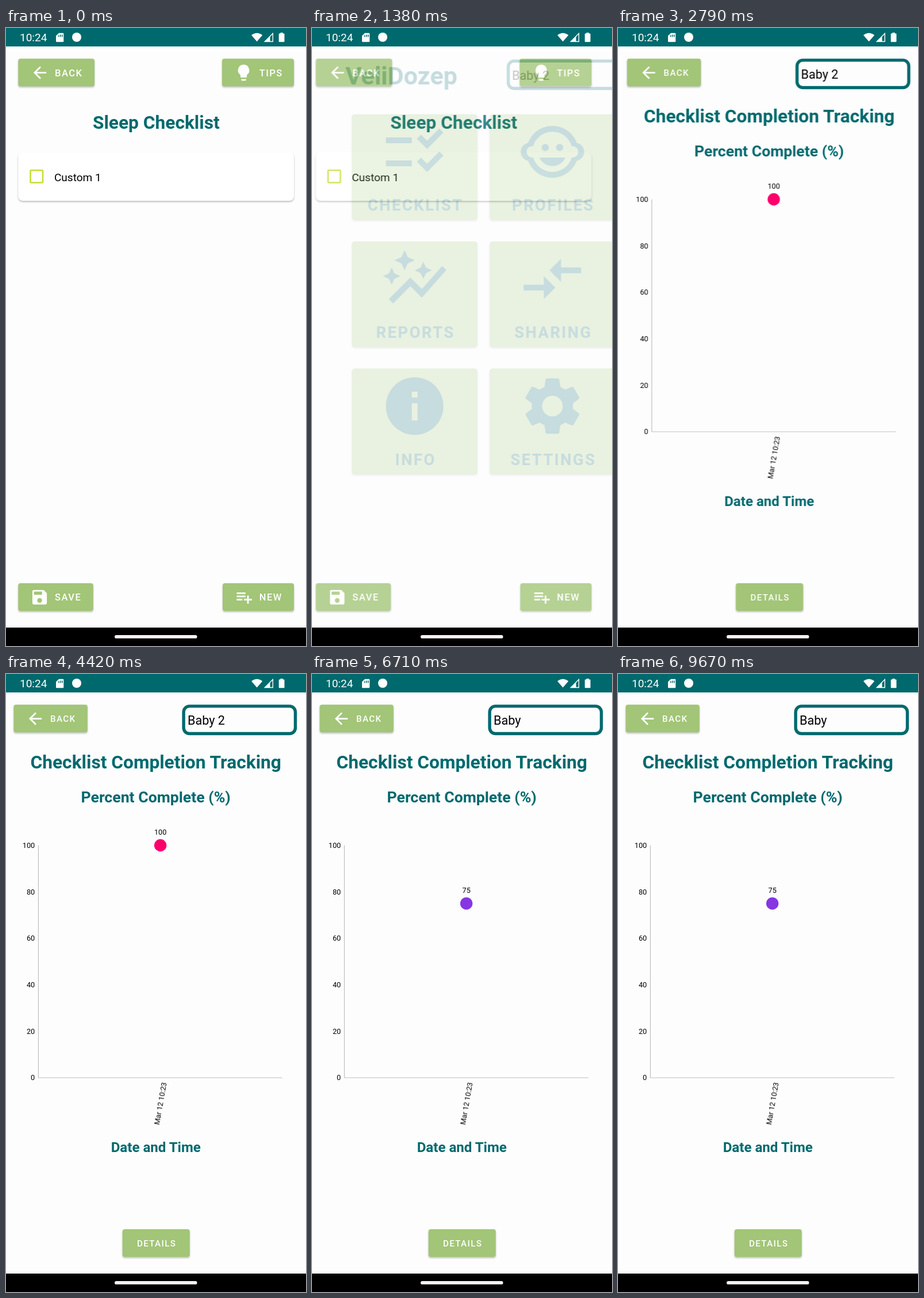
An HTML page that plays this animation: 522x1073 px, repeating every 9710 ms.

```html
<!DOCTYPE html>
<html lang="en">
<head>
<meta charset="utf-8">
<title>Sleep checklist app</title>
<style>
  html, body { margin: 0; width: 100%; height: 100%; overflow: hidden; background: #fdfdfe; }
  svg { display: block; width: 100vw; height: 100vh; font-family: Roboto, sans-serif; }
  .teal { fill: #00696d; }
  .white { fill: #fff; }
  .bold { font-weight: 700; }
  .mid { text-anchor: middle; }
  .end { text-anchor: end; }
  .page { fill: #fdfdfe; }
  .green { fill: #a2c577; }
  .raised { filter: drop-shadow(0 2px 1.8px rgba(0, 0, 0, .25)); }
  .label { font-weight: 500; letter-spacing: .0893em; fill: #fff; }
  .tile { font-weight: 700; font-size: 27.4px; letter-spacing: .0893em; }
  .small { font-size: 12.7px; }

  #checklist, #home, #report, #tap, #before, #after { animation: 9710ms linear infinite; }
  #checklist { animation-name: exit-first; }
  #home { animation-name: enter-home, fade-home; }
  #homeBody { animation: exit-second 9710ms linear infinite; }
  #report { animation-name: enter-report, fade-report; }
  #tap { animation-name: tap; animation-timing-function: step-end; }
  #before { animation-name: hide; animation-timing-function: step-end; }
  #after { animation-name: show; animation-timing-function: step-end; }

  /* Each 450 ms slide is a fast start joined to a very slow stop. */
  @keyframes exit-first {
    0%, 13.522% { transform: translateX(0); animation-timing-function: cubic-bezier(.3, 0, .8, .15); }
    14.295% { transform: translateX(-20.88px); animation-timing-function: cubic-bezier(.05, .7, .1, 1); }
    18.157%, 100% { transform: translateX(-52.2px); }
  }
  @keyframes enter-home {
    0%, 13.522% { transform: translateX(52.2px); animation-timing-function: cubic-bezier(.3, 0, .8, .15); }
    14.295% { transform: translateX(31.32px); animation-timing-function: cubic-bezier(.05, .7, .1, 1); }
    18.157%, 100% { transform: translateX(0); }
  }
  @keyframes fade-home {
    0%, 14.037% { opacity: 0; }
    14.892%, 100% { opacity: 1; }
  }
  @keyframes exit-second {
    0%, 26.365% { transform: translateX(0); animation-timing-function: cubic-bezier(.3, 0, .8, .15); }
    27.137% { transform: translateX(-20.88px); animation-timing-function: cubic-bezier(.05, .7, .1, 1); }
    30.999%, 100% { transform: translateX(-52.2px); }
  }
  @keyframes enter-report {
    0%, 26.365% { transform: translateX(52.2px); animation-timing-function: cubic-bezier(.3, 0, .8, .15); }
    27.137% { transform: translateX(31.32px); animation-timing-function: cubic-bezier(.05, .7, .1, 1); }
    30.999%, 100% { transform: translateX(0); }
  }
  @keyframes fade-report {
    0%, 26.88% { opacity: 0; }
    27.734%, 100% { opacity: 1; }
  }
  @keyframes tap {
    0% { opacity: 0; }
    22.35% { opacity: 1; }
    24%, 100% { opacity: 0; }
  }
  @keyframes hide { 0% { opacity: 1; } 64.88%, 100% { opacity: 0; } }
  @keyframes show { 0% { opacity: 0; } 64.88%, 100% { opacity: 1; } }
</style>
</head>
<body>
<svg id="stage" viewBox="0 0 522 1073" preserveAspectRatio="none"></svg>
<script>
const path = d => `<path d="${d}"/>`;
const sixTeeth = [0, 60, 120, 180, 240, 300].map(a =>
  `<path transform="rotate(${a} 12 12)" d="M9.25 5.35 9.6 2.8q.05-.4.48-.4h3.84q.43 0 .48.4l.35 2.55L12 12z"/>`).join('');

// All icons are drawn on a 24 by 24 grid.
const icons = {
  back: path('M20 11H7.83l5.59-5.59L12 4l-8 8 8 8 1.41-1.41L7.83 13H20z'),
  bulb: path('M9 21q0 1 1 1h4q1 0 1-1v-1H9zM12 2a7 7 0 0 0-4 12.74V17q0 1 1 1h6q1 0 1-1v-2.26A7 7 0 0 0 12 2z'),
  save: path('M17 3H5a2 2 0 0 0-2 2v14a2 2 0 0 0 2 2h14a2 2 0 0 0 2-2V7zM12 19a3 3 0 1 1 0-6 3 3 0 0 1 0 6zM15 9H5V5h10z'),
  add: path('M14 10H3v2h11zM14 6H3v2h11zM18 14v-4h-2v4h-4v2h4v4h2v-4h4v-2zM3 16h7v-2H3z'),
  checks: path('M11 7H2v2h9zM11 15H2v2h9z') + [0, 8].map(y =>
    `<path transform="translate(0 ${y})" d="M16.34 11 12.8 7.46l1.41-1.41 2.12 2.12 4.24-4.24L22 5.34z"/>`).join(''),
  face: `<circle cx="4.2" cy="12" r="3.2"/><circle cx="19.8" cy="12" r="3.2"/><circle cx="12" cy="12" r="9"/>
    <g class="green"><circle cx="5" cy="12" r="2"/><circle cx="19" cy="12" r="2"/><circle cx="12" cy="12" r="7"/></g>
    <circle cx="9.5" cy="10.5" r="1.25"/><circle cx="14.5" cy="10.5" r="1.25"/>
    <path d="M7.5 14a4.9 4.9 0 0 0 9 0z"/>`,
  graph: [[8.5, 5.5, 1], [15, 9, .86], [4, 11, .86]].map(([x, y, s]) =>
    `<path transform="translate(${x} ${y}) scale(${s})" d="M0-3.5 1.09-1.09 3.5 0 1.09 1.09 0 3.5-1.09 1.09-3.5 0-1.09-1.09z"/>`).join('') +
    path('M4.5 20.5l6-6.01 4 4L23 8.93l-1.41-1.41-7.09 7.97-4-4L3 19z'),
  arrows: path('M9.01 14H2v2h7.01v3L13 15l-3.99-4zM14.99 13v-3H22V8h-7.01V5L11 9z'),
  info: path('M12 2a10 10 0 1 0 0 20 10 10 0 0 0 0-20zM13 17h-2v-6h2zM13 9h-2V7h2z'),
  gear: `${sixTeeth}<circle cx="12" cy="12" r="7.2"/><circle class="green" cx="12" cy="12" r="3.6"/>`
};

const icon = (name, x, y, scale, cls) =>
  `<g class="${cls}" fill-rule="evenodd" transform="translate(${x} ${y}) scale(${scale}) translate(-12 -12)">${icons[name]}</g>`;
const text = (str, x, y, size, cls = '') =>
  `<text x="${x}" y="${y}" font-size="${size}" class="${cls}">${str}</text>`;
const rect = (x, y, w, h, r, cls) =>
  `<rect x="${x}" y="${y}" width="${w}" height="${h}" rx="${r}" class="${cls}"/>`;
const page = rect(-60, 32, 642, 1009, 0, 'page');

const button = (label, x, y, w, size, textX, iconName, iconX) =>
  rect(x, y, w, 48, 4, 'green raised') +
  (iconName ? icon(iconName, iconX, y + 24.3, 1.4, 'white') : '') +
  text(label, textX, y + 24.5 + size * .355, size, 'label');

const spinner = (x, y) =>
  `<rect x="${x + 2.7}" y="${y + 2.7}" width="194.4" height="47.6" rx="10" fill="#fdfdfe" stroke="#00696d" stroke-width="5.4"/>`;

const tile = (label, iconName, i) => {
  const x = 31.7 + (i % 2) * 239.7, y = 149.7 + Math.floor(i / 2) * 220.8;
  return rect(x, y, 218.5, 183.8, 5, 'green raised') +
    icon(iconName, x + 109.3, y + 65.2, 5, 'teal') +
    text(label, x + 110.8, y + 167.4, 27.4, 'tile teal mid');
};

const marker = (id, value, color, name) => {
  const y = 701 - value * 4.035;
  return `<g id="${id}">${text(name, 316, 88, 21.6)}
    <circle cx="268.6" cy="${y}" r="10.7" fill="${color}"/>
    ${text(value, 268.7, y - 18.2, 12.7, 'mid')}</g>`;
};

const checklist = `<g id="checklist">${page}
  ${button('BACK', 21.3, 53.3, 132.7, 16.5, 85, 'back', 59)}
  ${button('TIPS', 376, 53.3, 125, 16.5, 440.7, 'bulb', 413.5)}
  ${text('Sleep Checklist', 261.3, 175, 31.7, 'bold teal mid')}
  ${rect(21.3, 215.5, 479.7, 84.5, 8, 'white raised')}
  <rect x="42.5" y="247" width="21.5" height="21.5" rx="1.5" fill="none" stroke="#c9dc35" stroke-width="2.6"/>
  ${text('Custom 1', 84, 265.5, 19)}
  ${button('SAVE', 21.3, 964, 130.5, 16.5, 85, 'save', 58.5)}
  ${button('NEW', 377, 964, 124, 16.5, 440.8, 'add', 414)}</g>`;

const tiles = [['CHECKLIST', 'checks'], ['PROFILES', 'face'], ['REPORTS', 'graph'],
  ['SHARING', 'arrows'], ['INFO', 'info'], ['SETTINGS', 'gear']];
const home = `<g id="home">${page}<g id="homeBody">
  ${text('VeliDozep', 20.6, 98, 43.1, 'bold teal')}
  ${spinner(301.2, 54.7)}${text('Baby 2', 310.4, 89.6, 21.6)}
  ${tiles.map(([label, name], i) => tile(label, name, i)).join('')}
  <circle id="tap" cx="100" cy="506.5" r="11.3" fill="#e6edd6" fill-opacity=".9" stroke="#a9cbd6" stroke-width="1.4"/></g></g>`;

const report = `<g id="report">${page}
  ${button('BACK', 13.4, 53.3, 128.4, 15.2, 77, 'back', 51)}
  ${spinner(306.4, 53.2)}
  ${text('Checklist Completion Tracking', 260.7, 164.3, 31.7, 'bold teal mid')}
  ${text('Percent Complete (%)', 260.6, 223, 26.65, 'bold teal mid')}
  ${[0, 20, 40, 60, 80, 100].map(v => text(v, 50.2, 705.4 - v * 4.035, 12.7, 'end')).join('')}
  <path d="M56.4 297.5V701H481" fill="none" stroke="#bfbfc2" stroke-width="1.2"/>
  ${marker('before', 100, '#fb006c', 'Baby 2')}
  ${marker('after', 75, '#8636e2', 'Baby')}
  <g transform="translate(269.2 745.8) rotate(-80)">${text('Mar 12 10:23', 0, 4.4, 12.7, 'mid')}</g>
  ${text('Date and Time', 260.8, 830, 24.1, 'bold teal mid')}
  ${button('DETAILS', 202.7, 964, 117, 15.2, 228, '', 0)}</g>`;

const bars = `${rect(0, 0, 522, 32, 0, 'teal')}
  ${text('10:24', 24, 23.3, 19, 'white')}
  <path class="white" d="M92 8.7h7q1.3 0 1.3 1.3v13q0 1.3-1.3 1.3H88.300q-1.3 0-1.3-1.3V13.500z"/>
  <path class="teal" d="M91 12.500h1.500v3H91zM94 11.500h1.500v4H94zM97 11.500h1.500v4H97z"/>
  <circle class="white" cx="123" cy="16" r="8"/>
  <path class="white" d="M427 12.500q9.600-7.500 19.200 0L436.600 23.500z"/>
  <path d="M464.300 9.500V23.500H450.300z" fill="none" stroke="#fff" stroke-width="1.400"/>
  <path class="white" d="M459.500 14.500V24H449.500z"/>
  <path class="white" d="M474.700 10.500q0-1 1-1h1.800V8h4.200v1.500h1.800q1 0 1 1v12.700q0 1-1 1h-7.800q-1 0-1-1z"/>
  <rect y="1041" width="522" height="32"/>
  <rect x="189" y="1054" width="143.500" height="5.800" rx="2.900" fill="#f6f1f2"/>`;

document.getElementById('stage').innerHTML = checklist + home + report + bars;
</script>
</body>
</html>
```
